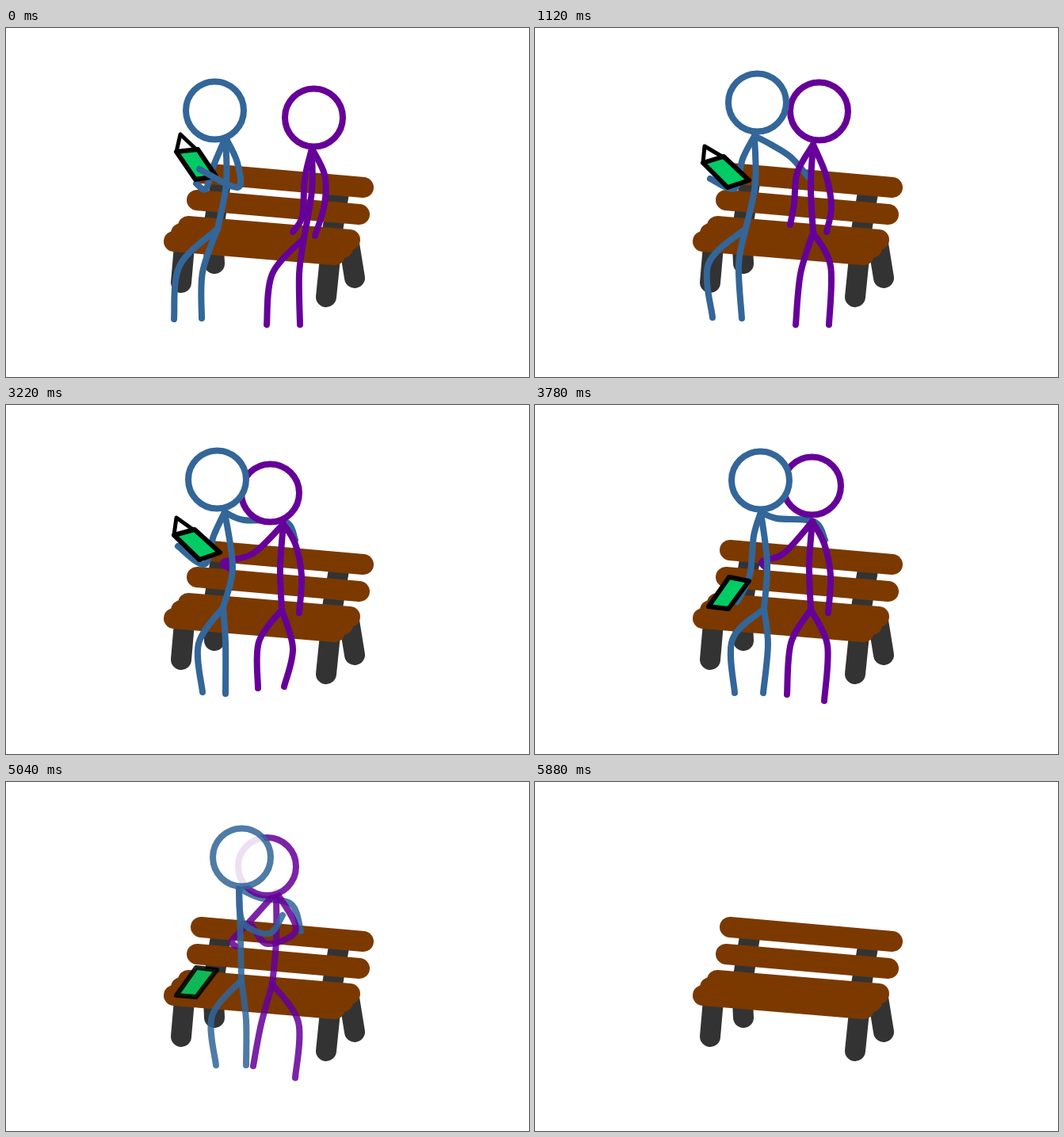
Recreate the animation shown at these times as an HTML page with a canvas. Size 660x440 px, loop 6160 ms.

```html
<!DOCTYPE html>
<html lang="en">
<head>
<meta charset="utf-8">
<title>Bench</title>
<style>
html, body { margin: 0; width: 100%; height: 100%; overflow: hidden; background: #fff; }
canvas { display: block; }
</style>
</head>
<body>
<canvas id="stage" width="660" height="440"></canvas>
<script>
const ctx = document.getElementById('stage').getContext('2d');
const STEP = 140, STEPS = 44, FADE_START = 35, FADE_STEPS = 7;
const BLUE = '#336699', PURPLE = '#660099', BROWN = '#7b3900', DARK = '#333';
ctx.lineCap = ctx.lineJoin = 'round';

const mix = (a, b, u) => a.map((v, i) => v + (b[i] - v) * u);
const blend = (p, q, u) =>
  Object.fromEntries(Object.keys(p).map(part => [part, mix(p[part], q[part], u)]));
const pairs = list =>
  list.flatMap((v, i) => i % 2 ? [] : [[v, list[i + 1]]]);

// Parts hold x, y pairs; legs are knee, foot, knee, foot.
const pose = (head, torso, left, right, legs) => ({ head, torso, left, right, legs });

const blueReading = pose([263.5, 104], [277, 138, 278, 196, 267, 253],
  [261, 176, 252, 203, 240, 196], [292, 170, 292, 201, 244, 178],
  [219, 300, 212, 367, 248, 308, 247, 366]);
const blueReaching = pose([280.5, 94], [277, 136, 278, 196, 266, 253],
  [262, 165, 252, 202, 221, 190], [298, 147, 323, 163, 345, 188],
  [219, 297, 224, 365, 257, 298, 261, 366]);
const blueHolding = pose([266.5, 94], [276, 135, 286, 205, 274, 255],
  [262, 165, 250, 201, 217, 178], [300, 145, 352, 147, 365, 170],
  [243, 301, 248, 362, 277, 300, 277, 364]);
const blueLowering = pose([284.5, 95], [285, 135, 293, 200, 289, 257],
  [276, 165, 271, 215, 255, 248], [305, 143, 352, 147, 366, 170],
  [249, 296, 252, 363, 294, 302, 288, 363]);
const blueHugging = pose([297.5, 95], [294, 134, 296, 200, 297, 250],
  [299, 177, 332, 191, 349, 168], [320, 146, 360, 154, 372, 188],
  [260, 295, 265, 357, 303, 300, 303, 357]);
const blueFreed = {
  ...blend(blueLowering, blueHugging, 0.7),
  left: [285, 165, 279, 210, 264, 240]
};

const purpleSitting = pose([388.5, 113], [386, 152, 386, 205, 376, 265],
  [377, 190, 374, 237, 362, 257], [402, 185, 402, 222, 390, 262],
  [336, 310, 329, 374, 370, 310, 371, 374]);
const purpleLeaning = pose([358.5, 105], [351, 147, 348, 200, 351, 258],
  [331, 182, 327, 222, 322, 248], [367, 185, 374, 225, 368, 257],
  [335, 310, 329, 374, 373, 300, 371, 374]);
const purpleTilting = {
  ...blend(purpleSitting, purpleLeaning, 0.75),
  torso: [367, 150, 367, 200, 374, 264],
  legs: purpleSitting.legs
};
const purpleHolding = pose([333.5, 111], [350, 150, 346, 205, 348, 258],
  [312, 187, 275, 198, 282, 206], [365, 175, 373, 215, 370, 262],
  [320, 300, 318, 364, 364, 300, 366, 368]);
const purpleRaised = pose([349.5, 102], [350, 147, 346, 200, 348, 258],
  [314, 187, 287, 197, 292, 206], [365, 175, 373, 215, 370, 262],
  [323, 300, 318, 365, 369, 303, 365, 373]);
const purpleHugging = pose([329.5, 106.5], [341, 139, 341, 200, 336, 255],
  [302, 182, 285, 200, 290, 207], [366, 186, 330, 204, 311, 182],
  [322, 305, 312, 358, 369, 303, 365, 373]);
const swing = (...legs) => ({ ...purpleHolding, legs });

const blueTrack = [
  [0, blueReading], [4, blueReading], [8, blueReaching], [12, blueHolding],
  [23, blueHolding], [27, blueLowering], [28, blueFreed], [32, blueHugging]
];
const purpleTrack = [
  [0, purpleSitting], [3, purpleTilting], [4, purpleTilting],
  [8, purpleLeaning], [12, purpleHolding],
  [15, swing(320, 301, 336, 326, 362, 304, 366, 354)],
  [18, swing(319, 303, 308, 354, 362, 304, 352, 352)],
  [20, swing(319, 303, 326, 348, 362, 304, 366, 356)],
  [23, swing(319, 299, 318, 357, 362, 307, 351, 355)],
  [27, purpleRaised], [28, blend(purpleRaised, purpleHugging, 0.5)],
  [32, purpleHugging]
];

// The tip belongs to the open cover.
const tablet = (tip, ...corners) => ({ tip, corners });
const tabletUp = tablet([220, 134], 215, 156, 242, 153, 265, 187, 239, 191);
const tabletFlat = tablet([215, 142], 212, 164, 238, 157, 270, 186, 244, 195);
const tabletLow = tablet([258, 220], 245, 217, 270, 222, 244, 257, 219, 254);
const tabletSeat = tablet([253, 235], 240, 234, 266, 237, 240, 271, 215, 269);
const tabletTrack = [
  [0, tabletUp], [4, tabletUp],
  [8, tablet([214, 149], 212, 170, 238, 162, 270, 192, 243, 201)],
  [12, tabletFlat], [23, tabletFlat],
  [25, tablet([236, 185], 224, 180, 247, 189, 217, 222, 194, 213)],
  [27, tabletLow], [28, tabletSeat]
];

function sample(track, step) {
  const i = track.findIndex(key => key[0] >= step);
  if (i < 0) return track[track.length - 1][1];
  if (i === 0) return track[0][1];
  const [from, p] = track[i - 1], [to, q] = track[i];
  return blend(p, q, (step - from) / (to - from));
}

function stroke(color, width) {
  ctx.strokeStyle = color;
  ctx.lineWidth = width;
  ctx.stroke();
}

function line(points, color, width) {
  ctx.beginPath();
  points.forEach(p => ctx.lineTo(...p));
  stroke(color, width);
}

// A smooth curve through all points.
function limb(points, color) {
  ctx.beginPath();
  ctx.moveTo(...points[0]);
  for (let i = 0; i < points.length - 1; i++) {
    const p = points[i], q = points[i + 1];
    const before = points[i - 1] || p, after = points[i + 2] || q;
    ctx.bezierCurveTo(
      p[0] + (q[0] - before[0]) / 6, p[1] + (q[1] - before[1]) / 6,
      q[0] - (after[0] - p[0]) / 6, q[1] - (after[1] - p[1]) / 6, ...q);
  }
  stroke(color, 8);
}

function bench() {
  const bar = color => (...ends) => line(pairs(ends), color, 26);
  const post = bar(DARK), slat = bar(BROWN);
  post(271, 195, 263, 245);
  post(262, 275, 263, 297);
  post(420, 208, 412, 255);
  post(433, 272, 440, 315);
  post(225, 275, 221, 321);
  post(409, 290, 404, 339);
  slat(246, 183, 451, 201);
  slat(241, 217, 446, 235);
  slat(230, 250, 434, 267);
  slat(221, 259, 425, 277);
  slat(212, 269, 415, 286);
}

function drawTablet(step) {
  const { tip, corners } = sample(tabletTrack, step);
  const [a, b, c, d] = pairs(corners);
  if (step < 25) line([a, tip, [b[0] - 2, b[1]]], '#000', 5);
  ctx.beginPath();
  [a, b, c, d].forEach(p => ctx.lineTo(...p));
  ctx.closePath();
  ctx.fillStyle = '#00cc66';
  ctx.fill();
  stroke('#000', 6);
}

const arm = (body, side, color) =>
  limb([body.torso.slice(0, 2), ...pairs(body[side])], color);

function figure(body, sides, color) {
  const torso = pairs(body.torso), legs = pairs(body.legs);
  limb([torso[2], legs[0], legs[1]], color);
  limb([torso[2], legs[2], legs[3]], color);
  limb(torso, color);
  sides.forEach(side => arm(body, side, color));
  ctx.beginPath();
  ctx.arc(...body.head, 36.5, 0, 2 * Math.PI);
  ctx.fillStyle = '#fff';
  ctx.fill();
  stroke(color, 8);
}

function draw(step) {
  ctx.globalAlpha = 1;
  ctx.fillStyle = '#fff';
  ctx.fillRect(0, 0, 660, 440);
  bench();
  const alpha = 1 - Math.max(0, step - FADE_START) / FADE_STEPS;
  if (alpha <= 0) return;
  ctx.globalAlpha = alpha;

  const blue = sample(blueTrack, step), purple = sample(purpleTrack, step);
  const reading = step < 6;
  if (!reading) arm(blue, 'right', BLUE);
  figure(purple, ['left', 'right'], PURPLE);
  figure(blue, ['left'], BLUE);
  drawTablet(step);
  if (reading) arm(blue, 'right', BLUE);
}

const start = performance.now();
function tick() {
  draw(Math.floor((performance.now() - start) / STEP) % STEPS);
  requestAnimationFrame(tick);
}
tick();
</script>
</body>
</html>
```
